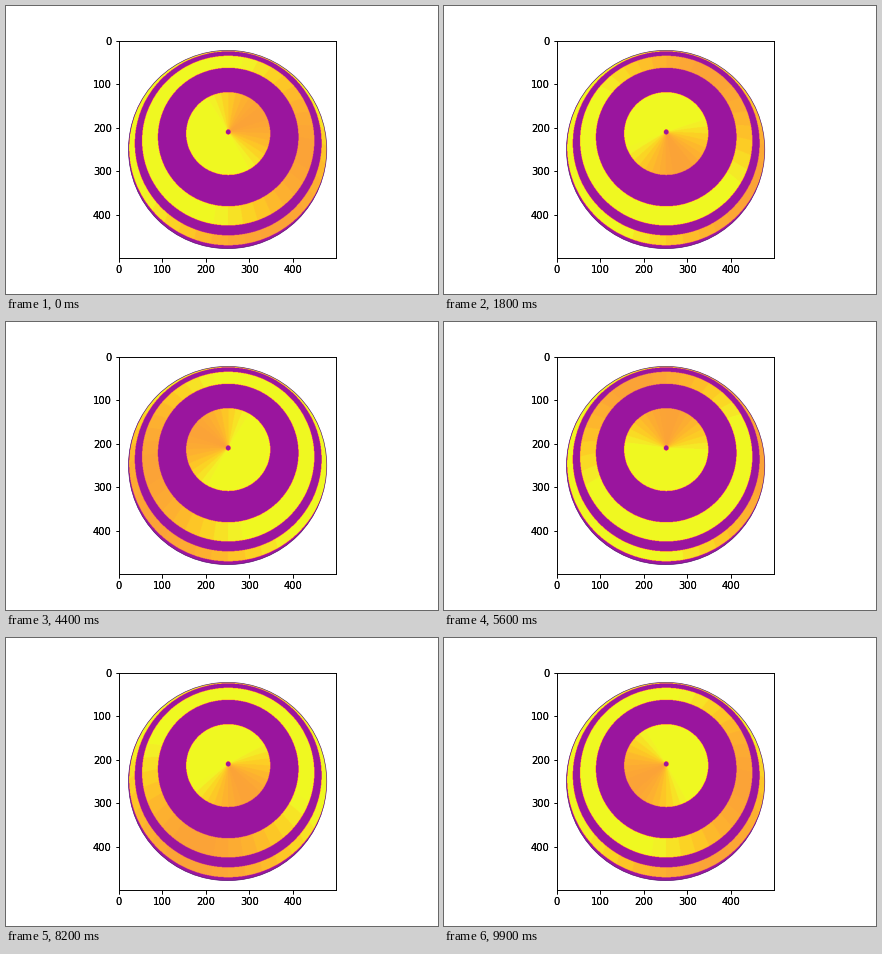
Write a matplotlib script that moves like this. It is 432 px wide and 288 px high and loops after 10 s.

```python
import numpy as np
import matplotlib.pyplot as plt
from matplotlib.animation import FuncAnimation
from matplotlib.patches import Circle

FRAMES = 100
SIZE, CENTER, RADIUS = 500, 250, 228
TILT = np.radians(10)
DARK, BRIGHT, DIP = 0.33, 1.0, 0.21

# colatitude range, start angle, turns per loop (negative is clockwise)
BANDS = [(1.5, 25, 30, -1.5), (45, 60, -10, -10), (70, 85, -60, -5)]


def sphere_grid():
    """Colatitude and longitude in degrees for each pixel of the tilted ball."""
    y, x = np.mgrid[:SIZE, :SIZE]
    nx, ny = (x - CENTER) / RADIUS, (CENTER - y) / RADIUS
    nz = np.sqrt(np.clip(1 - nx**2 - ny**2, 0, None))
    up = ny * np.sin(TILT) + nz * np.cos(TILT)
    side = ny * np.cos(TILT) - nz * np.sin(TILT)
    colat = np.degrees(np.arccos(np.clip(up, -1, 1)))
    return colat, np.degrees(np.arctan2(side, nx))


colat, lon = sphere_grid()
sector = np.floor(lon / 10) * 10 + 5
masks = [(colat >= lo) & (colat < hi) for lo, hi, _, _ in BANDS]


def surface(i):
    data = np.full((SIZE, SIZE), DARK)
    for mask, (_, _, start, turns) in zip(masks, BANDS):
        angle = start + 360 * turns * i / (FRAMES - 1)
        wave = np.cos(np.radians(sector[mask] - angle))
        data[mask] = BRIGHT - DIP * np.clip(wave, 0, None)
    return data


plt.rcParams["font.family"] = "DejaVu Sans"
fig = plt.figure(figsize=(6, 4), dpi=72, facecolor="white")
fig.subplots_adjust(left=0.125, right=0.9, bottom=0.125, top=0.88)
ax = fig.add_subplot()
img = ax.imshow(surface(0), cmap="plasma", vmin=0, vmax=1)
limb = Circle((CENTER, CENTER), RADIUS, fill=False, ec="#4b0a6b", lw=0.6)
ax.add_patch(limb)
img.set_clip_path(limb)

# a second frame on top gives the heavier tick labels
over = fig.add_axes(ax.get_position(original=True), facecolor="none")
over.set(xlim=ax.get_xlim(), ylim=ax.get_ylim(), aspect="equal")
for a in (ax, over):
    a.set_xticks(range(0, SIZE, 100))
    a.set_yticks(range(0, SIZE, 100))


def update(i):
    img.set_data(surface(i))
    return [img]


anim = FuncAnimation(fig, update, frames=FRAMES, interval=100,
                     repeat=True, repeat_delay=0)
plt.show()
```
